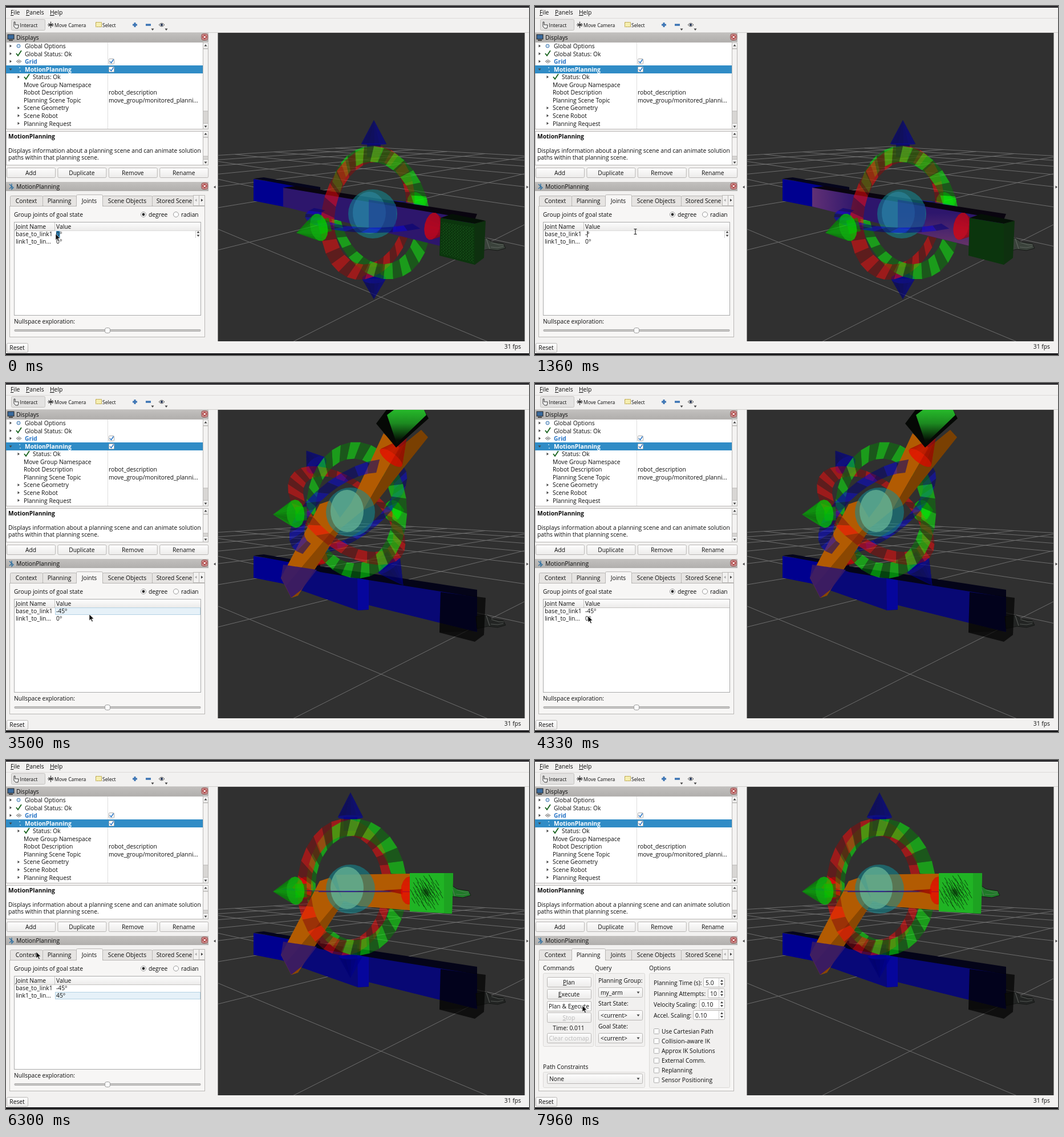
Recreate the animation shown at these times as an HTML page. Size 917x611 px, loop 8000 ms.

```html
<!DOCTYPE html>
<html lang="en">
<head>
<meta charset="utf-8">
<title>Motion planning</title>
<style>
html, body { margin: 0; width: 100%; height: 100%; overflow: hidden; background: #f2f1f0; }
svg { display: block; width: 917px; height: 611px; }
text { font: 500 10.3px "Open Sans", "Noto Sans", sans-serif; fill: #0c0c0c; white-space: pre; }
text.bold { font-weight: 700; }
text.small { font-size: 8.6px; }
</style>
</head>
<body>
<svg id="stage" viewBox="0 0 917 611"></svg>
<script>
const text = (x, y, s, attrs = '') =>
  `<text x="${x}" y="${y}" ${attrs}>${s.replace(/~(.)/, '<tspan text-decoration="underline">$1</tspan>')}</text>`;
const rect = (x, y, w, h, fill, stroke = 'none', r = 0) =>
  `<rect x="${x}" y="${y}" width="${w}" height="${h}" fill="${fill}" stroke="${stroke}" rx="${r}"/>`;
const poly = (points, fill, attrs = '') => `<polygon points="${points}" fill="${fill}" ${attrs}/>`;
const path = (d, stroke, width = 1, fill = 'none') =>
  `<path d="${d}" stroke="${stroke}" stroke-width="${width}" fill="${fill}"/>`;
const circle = (x, y, r, fill, stroke = 'none') =>
  `<circle cx="${x}" cy="${y}" r="${r}" fill="${fill}" stroke="${stroke}"/>`;
const group = (id, body) => `<g id="${id}">${body}</g>`;
const middle = 'text-anchor="middle"', border = '#b9b7b5', face = 'url(#face)';

// ---------- widgets ----------
const arrows = {
  right: (x, y) => poly(`${x - 1.5},${y - 2.5} ${x + 2},${y} ${x - 1.5},${y + 2.5}`, '#444'),
  left: (x, y) => poly(`${x + 1.5},${y - 2.5} ${x - 2},${y} ${x + 1.5},${y + 2.5}`, '#444'),
  down: (x, y) => poly(`${x - 2.5},${y - 1.5} ${x + 2.5},${y - 1.5} ${x},${y + 2}`, '#444'),
  up: (x, y) => poly(`${x - 2.5},${y + 1.5} ${x + 2.5},${y + 1.5} ${x},${y - 2}`, '#444')
};
const button = (x, y, w, h, label, ink = '#0c0c0c', fill = face) =>
  rect(x + .5, y + .5, w, h, fill, border, 2) +
  text(x + w / 2, y + h / 2 + 4.2, label, `${middle} style="fill:${ink}"`);
const combo = (x, y, w, label) =>
  rect(x + .5, y + .5, w, 17, face, border, 2) + text(x + 4, y + 13, label) + arrows.down(x + w - 7, y + 9);
const spinArrows = (x, y) => arrows.up(x, y - 3) + arrows.down(x, y + 3);
const spin = (x, y, value) =>
  rect(x + .5, y + .5, 332 - x, 16, '#fff', border, 2) + text(x + 4, y + 12.6, value) +
  path(`M322.5 ${y + 1}v15`, '#ccc') + spinArrows(327.5, y + 8.5);
const checkbox = (x, y, on) =>
  rect(x + .5, y + .5, 9, 9, '#fff', '#aaa', 1) + (on ? path(`M${x + 2} ${y + 5}l2.5 2.5 4-6`, '#2a76c6', 1.5) : '');
const tick = (x, y) => path(`M${x} ${y}l3 4 6-9`, '#14601a', 1.8);
const scrollbar = (y, h, thumb) =>
  rect(345.5, y + .5, 9, h, '#d8d6d4', border) + rect(345.5, y + .5, 9, 10, face, border) +
  rect(345.5, y + 11, 9, thumb, '#f4f3f2', border) + rect(345.5, y + h - 9.5, 9, 10, face, border) +
  arrows.up(350, y + 5) + arrows.down(350, y + h - 4);
const header = (y, label) =>
  rect(0, y, 355, 16, 'url(#bar)') + text(18, y + 12, label) +
  rect(343, y + 2, 10.5, 10.5, '#eadada', '#8a2020', 3) + rect(344.5, y + 3.5, 7.5, 7.5, '#a02222', 'none', 2) +
  path(`M346 ${y + 5}l4.5 4.500m0-4.500l-4.500 4.500`, '#fff', 1.3);

function toolbar() {
  return rect(0, 0, 917, 3, '#2c2b2f') + rect(0, 608, 917, 3, '#1a1a1c') +
    text(8, 15, '~File') + text(35, 15, '~Panels') + text(77, 15, '~Help') +
    path('M0 21.5H917', '#dddbd9') + path('M0 46.5H917', '#cfcdcb') +
    rect(9.5, 23.5, 59, 19, '#e3e2e1', '#c3c1bf', 2) +
    path('M14 28v8l3 3h4l1-6h-6v-5z', '#333', 1, '#fff') + text(24.5, 36.5, 'Interact', 'class="small"') +
    path('M73 33h11m-5.500-5.500v11m-4-8l8 5m0-5l-8 5', '#333', 1.2) + text(85, 36.5, 'Move Camera', 'class="small"') +
    `<rect x="157.500" y="28.500" width="10" height="8" fill="#f5eeb0" stroke="#a88d20" stroke-dasharray="2 1"/>` +
    text(169, 36.5, 'Select', 'class="small"') +
    path('M222 33h8m-4-4v8', '#3b74b4', 3) + path('M245 33h9', '#3b74b4', 3.5) +
    path('M268 33q5-6 10 0q-5 6-10 0z', '#666', 1, '#ddd') + circle(273, 33, 2, '#235') +
    arrows.down(257, 41) + arrows.down(281, 41);
}

function displaysPanel() {
  const rows = [
    [33, 'Global Options', 8], [33, 'Global Status: Ok', 8], [33, 'Grid', 8], [33, 'MotionPlanning', 0],
    [47, 'Status: Ok', 22], [31, 'Move Group Namespace', 0], [31, 'Robot Description', 0],
    [31, 'Planning Scene Topic', 0], [31, 'Scene Geometry', 22], [31, 'Scene Robot', 22],
    [31, 'Planning Request', 22], [31, 'Planned Path', 22]
  ];
  const styles = { 2: 'class="bold" style="fill:#2a76c6"', 3: 'class="bold" style="fill:#fff"' };
  const tree = rows.map(([x, label, arrow], i) => {
    const y = 74 + i * 13.55;
    return text(x, y, label, styles[i]) + (arrow ? arrows.right(arrow, y - 4) : '');
  }).join('');
  return header(47, 'Displays') + rect(3, 50, 11, 8, '#3a6a9c', '#222') + path('M5 60h7', '#222', 1.5) +
    rect(.5, 63.5, 345, 152, '#fff', border) + rect(0, 104, 345, 14, '#308cc6') +
    path('M178.500 64V104M178.500 118V215', '#dedede') +
    `<g clip-path="url(#tree)">${tree}</g>` + arrows.down(8, 111) +
    circle(22, 70, 3, '#cfe0f0', '#3f78b0') + tick(18, 83) + tick(32, 124) +
    path('M18 97l4.500-3 4.500 3-4.500 3zM20 95.500l5 3m0-3l-5 3', '#666', .8) +
    circle(24, 108, 1, '#bde') + circle(25, 114, 1, '#bde') +
    checkbox(180, 92, true) + checkbox(180, 106, true) +
    text(180, 155, 'robot_description') + text(180, 169, 'move_group/monitored_planni...') +
    scrollbar(64, 151, 109) +
    rect(.5, 219.5, 345, 59, '#fff', border) + scrollbar(219, 59, 33) +
    text(4, 232, 'MotionPlanning', 'class="bold"') +
    text(4, 257, 'Displays information about a planning scene and can animate solution') +
    text(4, 269, 'paths within that planning scene.') +
    ['Add', 'Duplicate', 'Remove', 'Rename'].map((s, i) => button(1 + i * 89.4, 283, 85, 17, s)).join('');
}

const tabs = [[7, 57, 'Context'], [64, 59, 'Planning'], [123, 46, 'Joints'], [169, 87, 'Scene Objects'], [256, 78, 'Stored Scene']];
function tabBar(active) {
  return rect(6.5, 350.5, 342, 229, '#f7f6f5', border) + tabs.map(([x, w, label], i) => {
    const on = i === active;
    return rect(x + .5, on ? 330.5 : 332.5, w, on ? 21 : 18, on ? '#f7f6f5' : '#e6e4e2', border, 2) +
      (on ? rect(x + 1, 349, w - 1, 4, '#f7f6f5') : '') + text(x + w / 2, 345, label, middle);
  }).join('') + rect(328.5, 331.5, 20, 18, '#f2f1f0', border) + path('M338.500 332v17', border) +
    `<g opacity=".4">${arrows.left(333, 340)}</g>` + arrows.right(343.5, 340);
}

function jointsTab() {
  return tabBar(2) + text(14, 369, 'Group joints of goal state') +
    circle(241, 365, 4.5, '#fff', '#999') + circle(241, 365, 2.4, '#222') + text(250, 369, 'degree') +
    circle(298, 365, 4.5, '#fff', '#999') + text(307, 369, 'radian') +
    rect(14.5, 378.5, 327, 163, '#fff', '#aaa') + rect(15, 379, 326, 14, face) +
    path('M15 393.500H341M85.500 379V393', '#c6c4c2') +
    text(17, 390, 'Joint Name') + text(88, 390, 'Value') +
    text(17, 403, 'base_to_link1') + text(17, 416, 'link1_to_lin...') + group('values', '') +
    text(14, 556, 'Nullspace exploration:') + rect(15, 566.5, 326, 3, '#c8c6c4', '#aaa', 1) +
    rect(173.5, 563.5, 9, 9, '#fafafa', '#999', 3);
}

function planningTab() {
  const frame = (x, y, w, h) => rect(x + .5, y + .5, w, h, '#f1f0ef', '#dbd9d7', 2);
  const fields = [[295, 'Planning Time (s):', '5.0'], [303, 'Planning Attempts:', '10'], [288, 'Velocity Scaling:', '0.10'], [277, 'Accel. Scaling:', '0.10']];
  const options = ['Use Cartesian Path', 'Collision-aware IK', 'Approx IK Solutions', 'External Comm.', 'Replanning', 'Sensor Positioning'];
  const states = [['Planning Group:', 'my_arm'], ['Start State:', '&lt;current&gt;'], ['Goal State:', '&lt;current&gt;']];
  return tabBar(1) + text(14, 368, 'Commands') + text(105, 368, 'Query') + text(200, 368, 'Options') +
    frame(14, 373, 88, 128) + frame(105, 373, 87, 128) + frame(200, 373, 141, 200) + frame(14, 546, 178, 27) +
    button(21, 380, 77, 17, '~Plan') + button(21, 401, 77, 17, '~Execute') +
    button(21, 422, 77, 17, 'Plan &amp; E~xecute') + button(21, 442, 77, 17, '~Stop', '#bbb') +
    text(59, 473, 'Time: 0.011', middle) + button(21, 478, 77, 17, 'Clear octomap', '#bbb') +
    group('hover', button(21, 422, 77, 17, 'Plan &amp; E~xecute', '#0c0c0c', '#fff')) +
    states.map(([label, value], i) => text(111, 390 + i * 40, label) + combo(111, 398 + i * 40, 77, value)).join('') +
    fields.map(([x, label, value], i) => text(208, 393.5 + i * 19.2, label) + spin(x, 381 + i * 19, value)).join('') +
    options.map((s, i) => checkbox(208, 470 + i * 17.1, false) + text(222, 478.5 + i * 17.1, s)).join('') +
    text(14, 541, 'Path Constraints') + combo(21, 549, 167, 'None');
}

// ---------- 3D view ----------
const horizon = 207, yaw = 47 * Math.PI / 180, sinYaw = Math.sin(yaw), cosYaw = Math.cos(yaw);

// Ground lines run towards two vanishing points; 1/slope grows by a fixed step per cell.
function grid() {
  const left = -69, right = 1257, cells = 7;
  const slopeA = i => 1 / (2.4 + i * 2.18), slopeB = i => 1 / (1.98 + i * 2.04);
  const farA = slopeA(cells), farB = slopeB(cells);
  let d = '';
  for (let i = 0; i <= cells; i++) {
    const a = slopeA(i), b = slopeB(i);
    const xa = (farB * right + a * left) / (a + farB), xb = (b * right + farA * left) / (b + farA);
    d += `M${xa} ${horizon + a * (xa - left)}L1000 ${horizon + a * (1000 - left)}`;
    d += `M${xb} ${horizon + b * (right - xb)}L300 ${horizon + b * (right - 300)}`;
  }
  return path(d, '#747474', .9);
}

// Rings and arrows around a centre, tilted by pitch; split into parts behind and before the arm.
function marker(cx, cy, pitch) {
  const c = Math.cos(pitch), s = Math.sin(pitch), size = 119;
  const X = [sinYaw * c, -cosYaw * c, s], Y = [cosYaw, sinYaw, 0], Z = [-sinYaw * s, cosYaw * s, c];
  const mix = (...terms) => [0, 1, 2].map(i => terms.reduce((sum, [k, v]) => sum + k * v[i], 0));
  const project = ([x, depth, up]) => {
    const w = 1 + .18 * (depth - .17 * up);
    return [cx + size * x / w, horizon + (cy - horizon - size * up) / w].map(n => n.toFixed(1)).join();
  };
  const parts = { back: '', front: '' };

  function ring(u, v, bright, dim) {
    const at = (i, r) => mix([r * Math.cos(i * Math.PI / 16), u], [r * Math.sin(i * Math.PI / 16), v]);
    for (let i = 0; i < 32; i++) {
      const corners = [at(i, 1), at(i + 1, 1), at(i + 1.5, .77), at(i + .5, .77)];
      const beforeArm = corners[0][0] * Y[0] + corners[0][1] * Y[1] < -.25;
      parts[beforeArm ? 'front' : 'back'] += poly(corners.map(project).join(' '), i % 2 ? bright : dim, 'fill-opacity=".52"');
    }
  }

  function arrow(axis, sign, u, v, rgb, layer) {
    const rim = a => mix([1.03 * sign, axis], [.18 * Math.cos(a), u], [.18 * Math.sin(a), v]);
    const tip = project(mix([1.37 * sign, axis]));
    const shade = k => `rgb(${rgb.map(n => Math.round(n * k))})`;
    const faces = [];
    for (let i = 0; i < 16; i++) {
      const p = rim(i * Math.PI / 8), q = rim((i + 1) * Math.PI / 8);
      faces.push({ depth: p[1] + q[1], svg: poly(`${tip} ${project(p)} ${project(q)}`, shade(.7 + .1 * Math.cos(i * .8))) });
    }
    faces.sort((a, b) => b.depth - a.depth);
    const disc = poly(Array.from({ length: 16 }, (_, i) => project(rim(i * Math.PI / 8))).join(' '), shade(1), 'opacity=".7"');
    const shaft = path(`M${project(mix([.84 * sign, axis]))}L${project(mix([1.03 * sign, axis]))}`, shade(.6), 24);
    parts[axis === Y ? layer : 'back'] += `<g opacity=".6">${shaft}</g>`;
    parts[layer] += `<g opacity=".68">${faces.map(f => f.svg).join('')}${disc}</g>`;
  }

  const red = [255, 0, 0], green = [0, 240, 0], blue = [0, 0, 180];
  arrow(Z, 1, X, Y, blue, 'back');
  arrow(Z, -1, X, Y, blue, 'back');
  arrow(X, -1, Y, Z, red, 'back');
  arrow(Y, 1, X, Z, green, 'back');
  ring(Y, Z, '#ff0808', '#860c0c');
  ring(X, Y, '#0000dc', '#000078');
  ring(X, Z, '#08ff08', '#087c08');
  arrow(X, 1, Y, Z, red, 'front');
  arrow(Y, -1, X, Z, green, 'front');
  return parts;
}

const sphere = (x, y, core) =>
  circle(x, y, 43, '#128c96', 'none').replace('/>', ' fill-opacity=".55"/>') +
  `<ellipse cx="${x - 6}" cy="${y - 2}" rx="29" ry="37" ${core}/>`;
const warmCore = 'fill="#66b496" fill-opacity=".75"';
const gripper = (dx, dy, fill) => `<g transform="translate(${dx} ${dy})">` +
  poly('824,409 842,406 852,413 872,416 876,424 862,428 845,426 826,430', fill, 'stroke="#161816"') +
  path('M842 407l6 18M851 414l13 4 9 0M850 422l12 1 10-2', '#80868080', 1.2) + '</g>';
const base = poly('434,303 551,320 551,364 434,341', '#00008f') + poly('434,302 452,300 551,317 551,324', '#05051c');

function restingArm() {
  return base + poly('486,318 636,341 636,397 617,398 486,352', '#080878') +
    poly('616,336 636,339 636,396 617,398', '#06069c') + poly('636,344 826,374 826,436 636,389', '#080874') +
    poly('505,315 551,321 636,333 826,362 826,375 636,345 551,331', '#040418') + gripper(0, 0, '#222423') +
    poly('762,366 841,376 838,441 822,453 760,437', '#000', 'fill-opacity=".68"') +
    poly('762,366 826,376 826,434 760,437', '#000', 'fill-opacity=".25"');
}

const lowerLink = poly('482,341 550,212 568,206 592,247 512,372 500,376', '#b25b02') +
  poly('592,247 512,372 500,376 491,355 582,247', '#8a4702') +
  poly('486,318 545,327 518,362 500,376 482,341', '#33186c', 'fill-opacity=".9"');

function straightPose() {
  const m = marker(645, 363, 0);
  return base + m.back +
    poly('486,318 820,373 826,436 636,389 486,351', '#2d166c') +
    poly('486,318 508,315 826,364 822,374 636,343', '#09040f') +
    group('blush', poly('486,318 620,340 620,385 486,351', 'url(#blushLeft)') + poly('636,343 762,364 762,420 636,389', 'url(#blushRight)')) +
    sphere(643, 364, 'fill="#38a0c8" fill-opacity=".35"') + poly('636,339 684,347 684,392 636,389', '#1c2490', 'fill-opacity=".42"') +
    m.front + gripper(0, 0, '#3a423b') +
    poly('762,371 822,381 822,453 760,437', '#0b350d') + poly('822,381 841,376 838,441 822,453', '#0e300f') +
    poly('762,371 782,364 841,376 822,381', '#041006') +
    group('speckle', poly('764,378 820,388 820,449 762,434', 'url(#dots)'));
}

function raisedPose() {
  const m = marker(604, 226, Math.PI / 4);
  return restingArm() + m.back + lowerLink +
    poly('575,250 605,210 662,88 690,113 627,222 590,252', '#b25b02') +
    poly('690,113 728,82 740,95 645,214 627,222', '#7a4002') +
    sphere(604, 226, warmCore) + m.front +
    poly('649,71 667,47 733,47 741,62 684,113', '#050805') + poly('668,56 680,47 733,47 737,56 685,106', 'url(#tipGreen)');
}

function bentPose() {
  const m = marker(604, 226, 0);
  let hatch = '';
  for (let i = 0; i < 80; i++) {
    const a = i * 2.4, r = 28 * i / 80;
    hatch += `M${737 + r * Math.cos(a) - 3} ${232 + r * Math.sin(a) - 5}l6 10`;
  }
  return restingArm() + m.back + lowerLink + poly('578,201 708,199 708,263 622,256 590,246', '#b25b02') +
    sphere(604, 226, warmCore) + path('M548 230.500H708', '#3a1c68', 1.3) +
    poly('662,228 695,226 695,235', '#a01800') + m.front + gripper(-61, -187, '#1f7a28') +
    poly('708,198 784,198 782,269 708,265', '#20b424') + poly('768,198 784,198 782,269 768,268', '#1da321') +
    path(hatch, '#0a3a0c', .9);
}

const stop = (offset, color, opacity = 1) => `<stop offset="${offset}" stop-color="${color}" stop-opacity="${opacity}"/>`;
const linear = (id, vertical, stops) => `<linearGradient id="${id}" x2="${vertical ? 0 : 1}" y2="${vertical ? 1 : 0}">${stops}</linearGradient>`;
const defs = '<defs>' +
  linear('face', true, stop(0, '#fdfdfd') + stop(1, '#ecebea')) +
  linear('bar', true, stop(0, '#c2c0be') + stop(1, '#b1afad')) +
  linear('blushLeft', false, stop(0, '#a05080', .45) + stop(.6, '#a05080', 0)) +
  linear('blushRight', true, stop(.25, '#a05080', 0) + stop(1, '#a05060', .5)) +
  linear('tipGreen', true, stop(0, '#26b82a') + stop(.4, '#1c8a20') + stop(.9, '#051005')) +
  '<pattern id="dots" width="5" height="5" patternUnits="userSpaceOnUse" patternTransform="skewY(9)"><path d="M1 1h1.500M3.500 3.500h1" stroke="#2a7c2c"/></pattern>' +
  '<clipPath id="tree"><rect y="64" width="345" height="151"/></clipPath>' +
  '<clipPath id="view"><rect x="371.500" y="47" width="538" height="540"/></clipPath></defs>';

const stage = document.getElementById('stage');
stage.innerHTML = defs + rect(0, 0, 917, 611, '#f2f1f0') + toolbar() + displaysPanel() +
  header(308, 'MotionPlanning') + path('M6 312l4 4-4 4M10 311v10l3-3-6-5', '#2f6f9f', 1.3) +
  group('joints', jointsTab()) + group('planning', planningTab()) +
  button(1, 590, 37, 16, 'Reset') + text(903, 600, '31 fps', 'text-anchor="end"') +
  arrows.left(366, 317) + arrows.right(914, 317) +
  '<g clip-path="url(#view)">' + rect(371, 47, 539, 540, '#303030') + grid() +
  group('straight', straightPose()) + group('raised', raisedPose()) + group('bent', bentPose()) + '</g>' +
  group('pointer', poly('0,0 0,11 2.6,8.6 4.6,13 6.4,12.2 4.5,8 8,7.7', '#111', 'stroke="#fff" stroke-width=".6"')) +
  group('ibeam', path('M-2.500-4.500h5M0-4.500v9M-2.500 4.500h5', '#111'));

// ---------- timeline ----------
const commit1 = 2740, edit2 = 4350, commit2 = 5340, openPlanning = 6650;
const cursorPath = [
  [0, 87, 399], [150, 87, 399], [700, 176, 395], [2800, 176, 395], [3350, 146, 405], [3700, 146, 405],
  [4200, 93, 408], [4500, 93, 408], [4900, 121, 401], [5610, 121, 401], [6280, 53, 336], [6350, 53, 336],
  [6560, 92, 340], [6750, 92, 340], [7260, 83, 430], [8000, 83, 430]
];
const typing1 = [[0, '0'], [1150, '-'], [1640, '-4'], [1900, '-45']];
const typing2 = [[0, '0'], [4700, '4'], [5120, '45']];
const latest = (steps, t) => steps.filter(([start]) => t >= start).pop()[1];
const element = id => document.getElementById(id);
const show = (id, on) => element(id).setAttribute('display', on ? 'inline' : 'none');

function cursorAt(t) {
  const i = cursorPath.findIndex(k => k[0] > t);
  const [t0, x0, y0] = cursorPath[i - 1], [t1, x1, y1] = cursorPath[i];
  const k = (t - t0) / (t1 - t0), e = k * k * (3 - 2 * k);
  return [x0 + (x1 - x0) * e, y0 + (y1 - y0) * e];
}

function valueRow(y, value, editing, hovered) {
  const width = [...value].reduce((w, ch) => w + (ch === '-' ? 3.4 : 5.9), 0);
  const selected = editing && value === '0';
  let out = hovered ? rect(86.5, y - 9.5, 254, 12, '#e6f1f8', '#b4d2e4') : '';
  if (editing) out += path(`M86 ${y - 9.5}H332`, '#ddd') + path(`M332.500 ${y - 10}v13`, '#ccc') + spinArrows(337, y - 4);
  if (selected) out += rect(88, y - 9, 6.5, 12, '#308cc6');
  out += text(88, y, value + '°');
  if (editing && !selected) out += path(`M${88.5 + width} ${y - 9}v11`, '#111');
  return out;
}

function draw(t) {
  const even = Math.floor(t / 70) % 2 === 0, planning = t >= openPlanning;
  show('straight', t < commit1);
  show('raised', t >= commit1 && t < commit2);
  show('bent', t >= commit2);
  show('speckle', even);
  show('blush', !even);
  show('joints', !planning);
  show('planning', planning);
  show('hover', t >= 7260);
  element('values').innerHTML =
    valueRow(403, latest(typing1, t), t < commit1, t >= commit1 && t < 4000) +
    valueRow(416, latest(typing2, t), t >= edit2 && t < commit2, t >= commit2);
  const [x, y] = cursorAt(t), beam = t >= 500 && t < 2850;
  show('pointer', !beam);
  show('ibeam', beam);
  for (const id of ['pointer', 'ibeam']) element(id).setAttribute('transform', `translate(${x} ${y})`);
}

function animate() {
  draw(performance.now() % 8000);
  requestAnimationFrame(animate);
}
animate();
</script>
</body>
</html>
```
